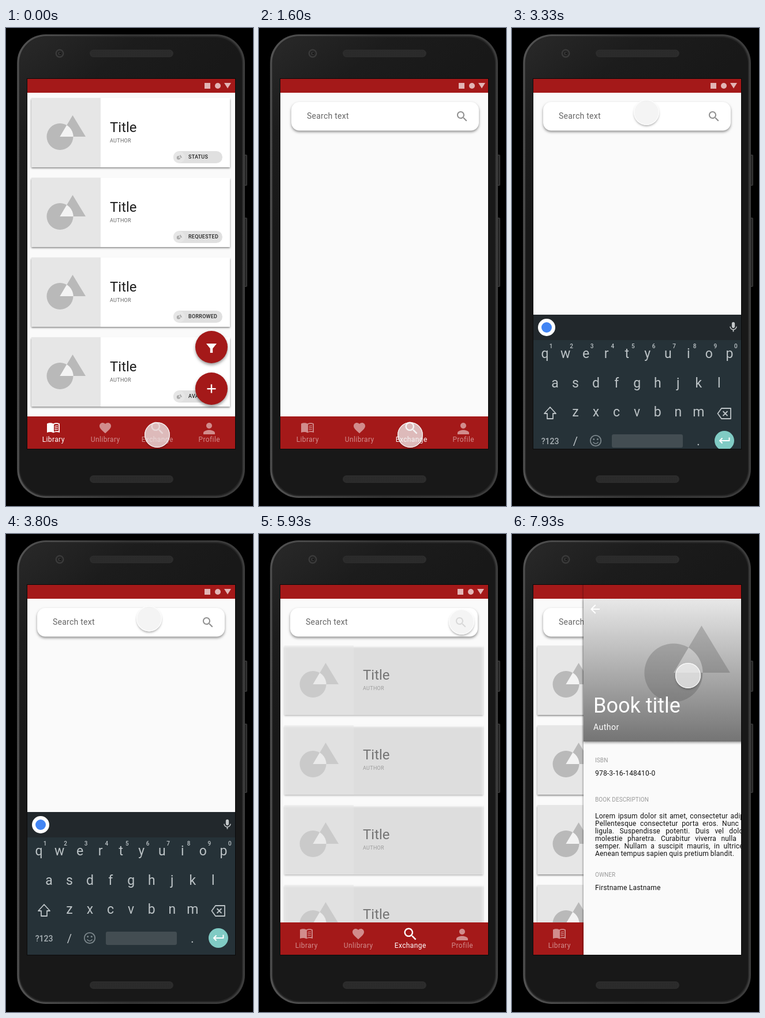
An HTML page with a canvas that plays this animation: 428x827 px, repeating every 8 s.

```html
<!DOCTYPE html>
<html lang="en">
<head>
<meta charset="utf-8">
<title>Library app</title>
<style>
html, body { margin: 0; width: 100%; height: 100%; overflow: hidden; background: #000; }
canvas { display: block; width: 428px; height: 827px; }
</style>
</head>
<body>
<canvas id="stage"></canvas>
<script>
const LOOP = 8000, FPS = 15;
const RED = '#a41919', PAPER = '#fafafa';
const SCREEN = { x: 37, y: 88, w: 360, h: 640 };

const canvas = document.getElementById('stage');
const c = canvas.getContext('2d');
const ratio = window.devicePixelRatio || 1;
canvas.width = 428 * ratio;
canvas.height = 827 * ratio;

const ICON = {
  heart: new Path2D('M12 21.35l-1.45-1.32C5.4 15.36 2 12.28 2 8.5 2 5.42 4.42 3 7.5 3c1.74 0 3.41.81 4.5 2.09C13.09 3.81 14.76 3 16.5 3 19.58 3 22 5.42 22 8.5c0 3.78-3.4 6.86-8.55 11.54z'),
  search: new Path2D('M15.5 14h-.79l-.28-.27C15.41 12.59 16 11.11 16 9.5 16 5.91 13.09 3 9.5 3S3 5.91 3 9.5 5.91 16 9.5 16c1.61 0 3.09-.59 4.23-1.57l.27.28v.79l5 4.99L20.49 19zm-6 0C7.01 14 5 11.99 5 9.5S7.01 5 9.5 5 14 7.01 14 9.5 11.99 14 9.5 14z'),
  person: new Path2D('M12 12c2.21 0 4-1.79 4-4s-1.79-4-4-4-4 1.79-4 4 1.79 4 4 4zm0 2c-2.67 0-8 1.34-8 4v2h16v-2c0-2.66-5.33-4-8-4z'),
  book: new Path2D('M1 4.5C4.5 2.6 9 2.8 12 4.5 15 2.8 19.5 2.6 23 4.5V20C19.5 18.6 15 18.6 12 20.5 9 18.6 4.5 18.6 1 20z'),
  page: new Path2D('M13 6C15.5 4.9 18.5 4.8 21.2 5.6V17.6C18.5 17 15.5 17.3 13 18.4z'),
  lines: new Path2D('M14.3 9.2Q17 8 20 8.4M14.3 12.2Q17 11 20 11.4M14.3 15.2Q17 14 20 14.4'),
  funnel: new Path2D('M3 4.5H21L14.2 13V20.5H9.8V13z'),
  back: new Path2D('M20 11H7.83l5.59-5.59L12 4l-8 8 8 8 1.41-1.41L7.83 13H20z'),
  mic: new Path2D('M12 14c1.66 0 3-1.34 3-3V5c0-1.66-1.34-3-3-3S9 3.34 9 5v6c0 1.66 1.34 3 3 3zm5.3-3c0 3-2.54 5.1-5.3 5.1S6.7 14 6.7 11H5c0 3.41 2.72 6.23 6 6.72V21h2v-3.28c3.28-.48 6-3.3 6-6.72z')
};

const clamp = v => Math.max(0, Math.min(1, v));
const easedLeft = t => (1 - clamp(t)) ** 3;

function rect(x, y, w, h, color) {
  c.fillStyle = color;
  c.fillRect(x, y, w, h);
}

function round(x, y, w, h, r, color) {
  c.beginPath();
  c.roundRect(x, y, w, h, r);
  c.fillStyle = color;
  c.fill();
}

function disc(x, y, r, color) {
  c.beginPath();
  c.arc(x, y, r, 0, 7);
  c.fillStyle = color;
  c.fill();
}

function poly(points, color) {
  c.beginPath();
  points.forEach(p => c.lineTo(...p));
  c.closePath();
  c.fillStyle = color;
  c.fill();
}

function stroke(path, color, width) {
  c.strokeStyle = color;
  c.lineWidth = width;
  c.stroke(path);
}

function text(str, x, y, size, color, { gap = 0, weight = 400, align = 'left' } = {}) {
  c.font = `${weight} ${size}px Roboto, "Open Sans", sans-serif`;
  c.letterSpacing = gap + 'px';
  c.textAlign = align;
  c.fillStyle = color;
  c.fillText(str, x, y);
}

function icon(path, cx, cy, scale, color) {
  at(cx, cy, scale, () => {
    c.translate(-12, -12);
    c.fillStyle = color;
    c.fill(path);
  });
}

function at(x, y, scale, draw) {
  c.save();
  c.translate(x, y);
  c.scale(scale, scale);
  draw();
  c.restore();
}

function shadowed(dy, blur, alpha, draw) {
  c.save();
  c.shadowColor = `rgba(0,0,0,${alpha})`;
  c.shadowOffsetY = dy * ratio;
  c.shadowBlur = blur * ratio;
  draw();
  c.restore();
}

function phone() {
  rect(0, 0, 428, 827, '#000');
  round(411, 219, 7, 54, 2, '#333');
  round(411, 328, 7, 120, 2, '#333');
  rect(414, 221, 2, 50, '#222');
  rect(414, 330, 2, 116, '#222');

  const rim = c.createLinearGradient(19, 0, 414, 0);
  rim.addColorStop(0, '#3a3a3a');
  rim.addColorStop(0.006, '#525252');
  rim.addColorStop(0.5, '#343434');
  rim.addColorStop(1, '#3c3c3c');
  round(19, 11, 395, 802, 50, rim);
  round(22.5, 14, 388, 796, 47, '#262626');

  const face = c.createLinearGradient(24, 16, 190, 220);
  face.addColorStop(0, '#292929');
  face.addColorStop(0.5, '#1c1c1c');
  face.addColorStop(1, '#181818');
  round(24, 16, 385, 792, 46, face);

  disc(93, 44, 7.5, '#3a3a3a');
  disc(93, 44, 5, '#202020');
  disc(93, 44, 3, '#343434');
  disc(94, 44, 1.4, '#111');
  for (const y of [37.5, 774]) {
    round(145, y, 145, 13, 6.5, '#2c2c2c');
    for (let i = 0; i < 46; i++)
      for (let j = 0; j < 3; j++) rect(149 + i * 3, y + 3 + j * 3, 1, 1, '#202020');
  }
  rect(36, 87, 362, 642, '#0a0a0a');
}

function statusBar(withIcons) {
  rect(37, 88, 360, 24, RED);
  if (!withIcons) return;
  const tint = 'rgba(255,255,255,.68)';
  rect(344, 95, 10, 10, tint);
  disc(367, 100, 5, tint);
  poly([[378, 95], [390, 95], [384, 104.5]], tint);
}

function navBar(active) {
  rect(37, 672, 360, 56, RED);
  ['Library', 'Unlibrary', 'Exchange', 'Profile'].forEach((label, i) => {
    const x = 82 + i * 90;
    const color = i === active ? '#fff' : '#d18c8c';
    text(label, x + 0.2, 716, 12, color, { gap: 0.4, align: 'center' });
    if (i === 0) {
      icon(ICON.book, x, 692, 1, color);
      icon(ICON.page, x, 692, 1, RED);
      at(x - 12, 680, 1, () => stroke(ICON.lines, color, 1.3));
    }
    if (i === 1) icon(ICON.heart, x, 692, 1, color);
    if (i === 2) icon(ICON.search, x + 0.3, 692.3, 1.2, color);
    if (i === 3) icon(ICON.person, x, 693, 1.25, color);
  });
}

// Circle and triangle placeholder; the overlap is lighter.
function shapes(x, y, scale, color, overlap) {
  at(x, y, scale, () => {
    const ring = new Path2D(), wedge = new Path2D('M22 -37L44.5 0H0z');
    ring.arc(0, 0, 23, 0, 7);
    const both = new Path2D(ring);
    both.addPath(wedge);
    c.fillStyle = color;
    c.fill(both, 'evenodd');
    c.clip(ring);
    c.fillStyle = overlap;
    c.fill(wedge);
  });
}

function card(y, status) {
  shadowed(1.5, 3, 0.5, () => rect(44, y, 344, 120, '#fff'));
  rect(44, y, 120, 120, '#e6e6e6');
  shapes(93.5, y + 67, 1, '#b9b9b9', '#f3f3f3');
  text('Title', 180, y + 59, 24, '#1f1f1f');
  text('AUTHOR', 180, y + 77.3, 9, '#666', { gap: 0.3 });
  if (!status) return;
  round(290, y + 92, 85, 21, 10.5, '#e0e0e0');
  disc(300, y + 102.5, 10, '#e6e6e6');
  shapes(299, y + 103.5, 0.14, '#aaa', '#ddd');
  text(status, 316, y + 105.4, 9, '#222', { gap: 0.25, weight: 500 });
}

function fab(y) {
  shadowed(3, 5, 0.4, () => disc(356, y, 28, RED));
}

function libraryPage() {
  rect(37, 88, 360, 640, PAPER);
  ['STATUS', 'REQUESTED', 'BORROWED', 'AVAILABLE'].forEach((s, i) => card(121 + i * 138, s));
  fab(552);
  icon(ICON.funnel, 356, 553.5, 1, '#fff');
  fab(624);
  rect(348.5, 623, 15, 2.4, '#fff');
  rect(354.8, 616.5, 2.4, 15, '#fff');
  statusBar(true);
  navBar(0);
}

function exchangePage(listAlpha) {
  rect(37, 88, 360, 640, PAPER);
  if (listAlpha > 0) {
    c.save();
    c.globalAlpha = listAlpha;
    for (let i = 0; i < 4; i++) card(193 + i * 138);
    c.restore();
  }
  shadowed(2.5, 4, 0.42, () => round(54, 128, 325, 49.5, 14, '#fff'));
  text('Search text', 81, 157, 14, '#666', { gap: 0.25 });
  icon(ICON.search, 350, 153, 1, '#8f8f8f');
  statusBar(true);
  navBar(2);
}

// Spreads the first part over a width, then goes on with the same gap.
function justified(part, width, rest, x, y) {
  const style = { gap: 0.2 };
  const words = part.split(' ');
  text('', 0, 0, 12, '#111', style);
  const widths = words.map(w => c.measureText(w).width);
  const gap = (width - widths.reduce((a, b) => a + b)) / (words.length - 1);
  words.concat(rest).forEach((w, i) => {
    text(w, x, y, 12, '#111', style);
    x += widths[i] + gap;
  });
}

function bookPage() {
  for (let i = 0; i < 3; i++) rect(34 + i, 88, 3 - i, 640, 'rgba(0,0,0,.07)');
  rect(37, 88, 360, 640, PAPER);
  statusBar(false);
  const fade = c.createLinearGradient(0, 112, 0, 359);
  fade.addColorStop(0, '#e8e8e8');
  fade.addColorStop(1, '#747474');
  shadowed(2, 4, 0.4, () => rect(37, 112, 360, 247, fade));
  rect(37, 88, 360, 24, RED);
  shapes(193, 240, 2.2, 'rgba(70,70,70,.27)', 'rgba(255,255,255,.12)');
  icon(ICON.back, 57, 130, 1, '#fff');
  text('Book title', 54, 309, 36, '#fff');
  text('Author', 54, 339, 14, '#fff', { gap: 0.5 });

  const label = (s, y) => text(s, 57, y, 10, '#999', { gap: 0.1 });
  const value = (s, y) => text(s, 57, y, 12, '#111', { gap: 0.2 });
  label('ISBN', 395);
  value('978-3-16-148410-0', 418);
  label('BOOK DESCRIPTION', 463);
  [
    ['Lorem ipsum dolor sit amet, consectetur', 230, 'adipiscing'],
    ['Pellentesque consectetur porta eros. Nunc', 249, 'vitae'],
    ['ligula. Suspendisse potenti. Duis vel', 223, 'dolor'],
    ['molestie pharetra. Curabitur viverra nulla', 245, 'quis'],
    ['semper. Nullam a suscipit mauris, in', 216, 'ultrices'],
    ['Aenean tempus sapien quis pretium blandit.', 241, '']
  ].forEach(([part, width, rest], i) => justified(part, width, rest, 57, 492 + i * 13));
  label('OWNER', 593);
  value('Firstname Lastname', 616);
}

function keyboard() {
  const ink = '#bcc3c6';
  rect(37, 481, 360, 44, '#22282c');
  rect(37, 525, 360, 203, '#263238');
  disc(60, 503, 15, '#fff');
  disc(60, 503, 9, '#4285f4');
  icon(ICON.mic, 383.5, 502.5, 0.88, '#c4c8ca');

  const mid = { align: 'center' };
  [['qwertyuiop', 57, 556], ['asdfghjkl', 74.5, 607], ['zxcvbnm', 110, 657]].forEach(([row, x, y], r) => {
    [...row].forEach((key, i) => {
      text(key, x + i * 35.55, y, 23, ink, mid);
      if (r === 0) text((i + 1) % 10, x + 10.5 + i * 35.6, 539, 10, ink, { weight: 500, align: 'center' });
    });
  });

  c.lineJoin = 'round';
  stroke(new Path2D('M66 641L76 652H71V661H61V652H56z'), ink, 1.8);
  stroke(new Path2D('M363 643H379V661H363L356.5 652zM365.5 648L373.5 656M373.5 648L365.5 656'), ink, 1.8);

  text('?123', 66, 705, 14, '#a9b1b5', { weight: 500, align: 'center' });
  text('/', 110, 707, 20, ink, mid);
  text('.', 323, 707, 22, ink, mid);
  const grey = '#7b868b';
  const face = new Path2D();
  face.arc(145, 699, 9.2, 0, 7);
  stroke(face, grey, 1.8);
  disc(141.7, 696.5, 1.5, grey);
  disc(148.3, 696.5, 1.5, grey);
  stroke(new Path2D('M140.5 701.5Q145 707 149.5 701.5'), grey, 1.6);
  round(173, 688, 123, 23, 3, '#434d52');
  disc(368, 699, 17, '#80cbc4');
  stroke(new Path2D('M376.5 693.5V699H360M364.5 694.5L360 699L364.5 703.5'), '#fff', 2);
}

function touch([x, y]) {
  c.save();
  c.beginPath();
  c.rect(0, 0, 428, 827);
  c.arc(x, y, 22, 0, 7);
  c.clip('evenodd');
  shadowed(2.5, 3.5, 0.3, () => disc(x, y, 21.5, '#fff'));
  c.restore();
  disc(x, y, 22, 'rgba(240,240,240,.75)');
  c.beginPath();
  c.arc(x, y, 21.4, 0, 7);
  c.strokeStyle = 'rgba(255,255,255,.85)';
  c.lineWidth = 1.2;
  c.stroke();
}

// Moves of the touch point: from step, to step, x, y.
const MOVES = [
  [46, 47, 233, 146], [56.1, 63, 348, 150], [69, 70, 349, 151], [82, 83, 349, 151.5],
  [85, 86, 349, 152], [88, 89, 351, 152], [93, 94, 343, 170], [96, 105, 305, 246.5],
  [114, 115, 305, 245]
];

function touchPoint(step) {
  return MOVES.reduce(([px, py], [from, to, x, y]) => {
    const f = clamp((step - from) / (to - from));
    return [px + (x - px) * f, py + (y - py) * f];
  }, [262, 704]);
}

const slide = (step, start) => Math.round(360 * easedLeft((step - start) / 6.72));

function keyboardDrop(step) {
  if (step < 47 || step >= 78) return null;
  if (step >= 75) return 207;
  return Math.round(247 * easedLeft((step - 46.9) / 5.1));
}

function shifted(dx, dy, draw) {
  c.save();
  c.translate(dx, dy);
  draw();
  c.restore();
}

function render(step) {
  c.setTransform(ratio, 0, 0, ratio, 0, 0);
  phone();
  c.save();
  c.beginPath();
  c.rect(SCREEN.x, SCREEN.y, SCREEN.w, SCREEN.h);
  c.clip();

  if (step < 47) libraryPage();
  if (step >= 19) {
    const dx = step < 47 ? slide(Math.min(step, 24), 18.47) : 0;
    const listAlpha = step >= 92 ? 1 : step >= 89 ? 0.55 : 0;
    shifted(dx, 0, () => exchangePage(listAlpha));
  }
  const drop = keyboardDrop(step);
  if (drop !== null) shifted(0, drop, keyboard);
  if (step >= 117) shifted(slide(step < 119 ? 117 : 119, 116.47), 0, bookPage);
  touch(touchPoint(step));
  c.restore();
}

const began = performance.now();
function tick() {
  const ms = (performance.now() - began) % LOOP;
  render(Math.min(119, Math.floor(ms * FPS / 1000 + 0.1)));
  requestAnimationFrame(tick);
}
tick();
</script>
</body>
</html>
```
